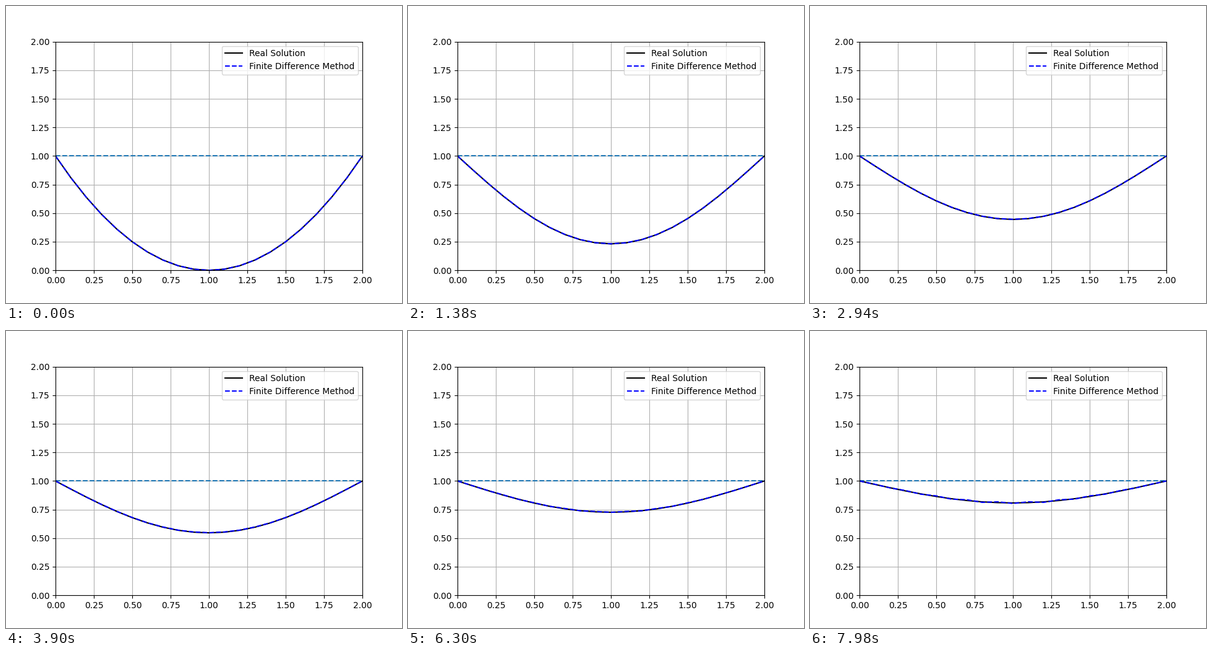
A matplotlib script for the animation above (8 s loop, 640x480 px).

```python
import numpy as np
import matplotlib.pyplot as plt
from matplotlib.animation import FuncAnimation

LENGTH, CELLS = 2.0, 20
STEPS = 134
DT = 1 / 195          # diffusivity is 1, so the explicit scheme is just unstable
TICK_MS, TICKS_PER_STEP, TICKS = 20, 3, 400

x = np.linspace(0, LENGTH, CELLS + 1)
ratio = DT / (x[1] - x[0]) ** 2


def exact(t):
    """Fourier solution of the heat equation with both ends held at 1."""
    n = np.arange(1, 200, 2)[:, None]
    k = n * np.pi / LENGTH
    modes = 8 * LENGTH**2 / (n * np.pi) ** 3 * np.sin(k * x) * np.exp(-k**2 * t)
    return 1 - modes.sum(axis=0)


def finite_differences():
    u = (x - 1) ** 2
    history = [u]
    for _ in range(STEPS - 1):
        u = u.copy()
        u[1:-1] += ratio * np.diff(u, 2)
        history.append(u)
    return history


real = [exact(i * DT) for i in range(STEPS)]
approx = finite_differences()

fig, ax = plt.subplots(figsize=(6.4, 4.8), dpi=100)
ax.set_xlim(0, 2)
ax.set_ylim(0, 2)
ax.grid()
ax.axhline(1, linestyle="--")
real_line, = ax.plot(x, real[0], "k", label="Real Solution")
approx_line, = ax.plot(x, approx[0], "b--", label="Finite Difference Method")
ax.legend(loc="upper right")


def update(tick):
    step = tick // TICKS_PER_STEP
    real_line.set_ydata(real[step])
    approx_line.set_ydata(approx[step])
    return real_line, approx_line


anim = FuncAnimation(fig, update, frames=TICKS, interval=TICK_MS,
                     init_func=lambda: update(0), blit=True,
                     repeat=True, repeat_delay=0)
plt.show()
```
